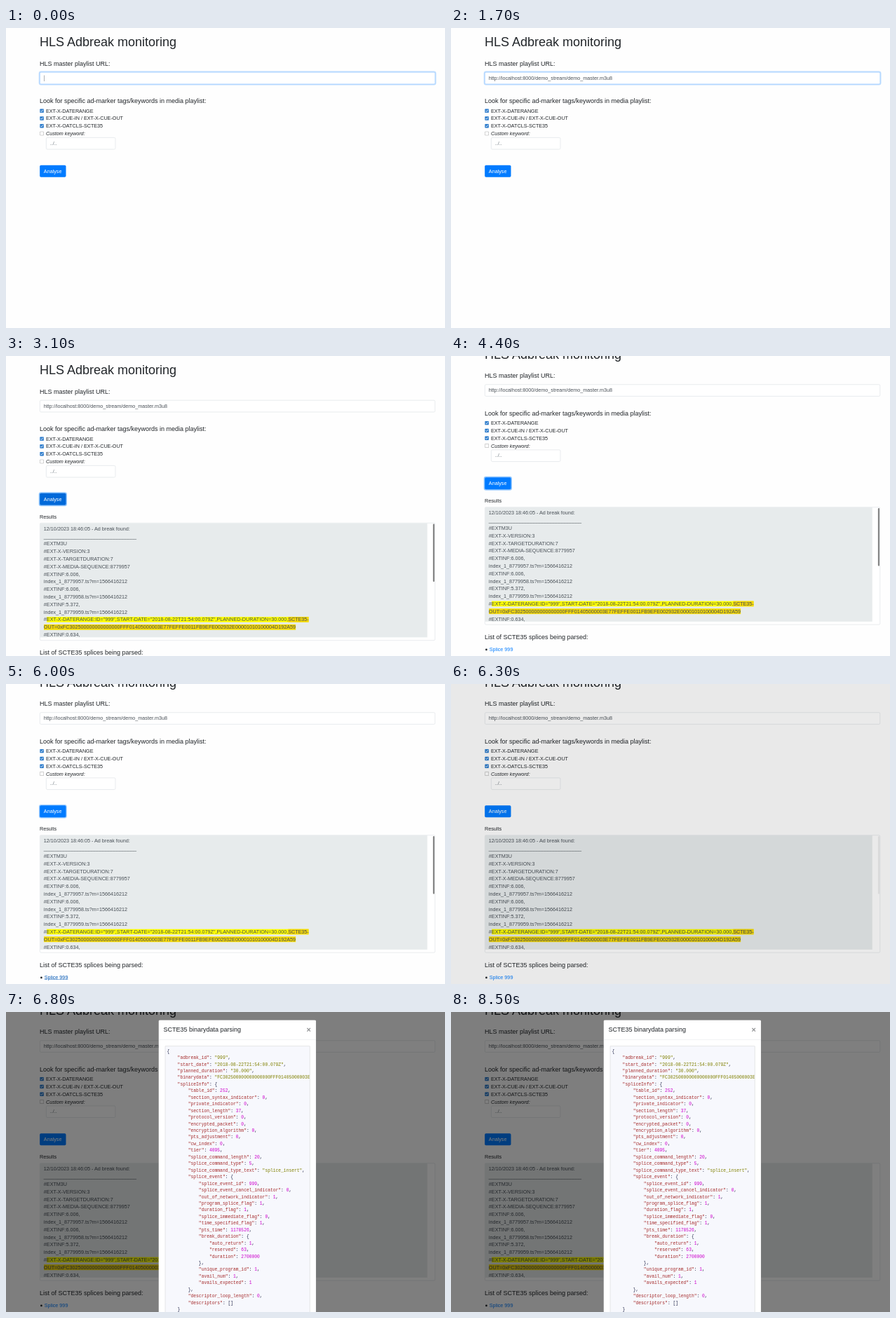
Animation of 626x428 px, one loop 8.9 s. Source, as an HTML page:

```html
<!DOCTYPE html>
<html lang="en">
<head>
<meta charset="utf-8">
<title>HLS Adbreak monitoring</title>
<style>
  html, body { margin: 0; width: 100%; height: 100%; overflow: hidden; background: #fefefe; }
  #stage { position: absolute; left: 0; top: 0; width: 1392px; height: 952px; overflow: hidden;
    transform: scale(.45); transform-origin: 0 0; background: #fefefe;
    font: 16px/24px "Liberation Sans", Arial, sans-serif; color: #212529; white-space: pre; }
  #stage *, #stage *::before { box-sizing: border-box; }
  #page, #backdrop { position: absolute; inset: 0; }
  #page > *, #modal > *, .abs { position: absolute; left: 106.7px; }
  h1, h5 { margin: 0; font-weight: 400; }
  h1 { font-size: 40px; line-height: 48px; }
  h5 { font-size: 20px; }
  .field { height: 38px; padding: 6px 12px; border: 1px solid #ced4da; border-radius: 4px;
    background: #fff; color: #495057; }
  .check { padding-left: 20px; }
  .check svg { position: absolute; left: 0; top: 5px; }
  #caret { position: absolute; left: 12px; top: 9px; width: 1.5px; height: 19px; background: #495057; }
  #button { top: 434.5px; height: 38px; padding: 7px 13px; border-radius: 4px; color: #fff; }
  #log { top: 529px; width: 1253px; height: 373px; padding: 0; overflow: hidden; }
  #text { width: 1227px; height: 362px; padding: 6px 12px; overflow: hidden; background: #e7ebec; }
  #text i { font-style: normal; background: #ff0; }
  #text b { font-weight: 400; background: #f3d70a; }
  #thumb { position: absolute; left: 1245px; top: 2px; width: 5px; height: 184px; border-radius: 3px; background: #858585; }
  #bullet { left: 108.5px; top: 977.5px; width: 6px; height: 6px; border-radius: 50%; background: #212529; }
  #link { left: 121.7px; top: 968px; }
  #backdrop { background: #000; }
  #modal { position: absolute; left: 483px; top: 25px; width: 500px; height: 1100px;
    background: #fff; border: 1px solid rgba(0, 0, 0, .2); border-radius: 5px; }
  #modal > h5 { left: 15px; top: 18px; }
  #close { left: 468px; top: 18px; font-size: 24px; font-weight: 700; opacity: .5; }
  #rule { left: 0; top: 62px; width: 498px; height: 1px; background: #dee2e6; }
  #json { left: 20px; top: 82px; width: 459px; margin: 0; padding: 5px 5px 12px; overflow: hidden;
    border: 1px solid #ccc; background: #f7f8fd;
    font: 14px/21px "Liberation Mono", monospace; color: #22264a; }
  #json::before { content: ""; position: absolute; left: 1px; bottom: 2px; width: 217px; height: 7px; background: #888; }
  .key { color: brown; } .string { color: olive; } .number { color: #c0c; }
</style>
</head>
<body>
<div id="stage">
  <div id="page">
    <h1 style="top:20px">HLS Adbreak monitoring</h1>
    <h5 style="top:99.5px">HLS master playlist URL:</h5>
    <div class="field" id="url" style="top:140px;width:1253px"><span id="address">http://localhost:8000/demo_stream/demo_master.m3u8</span><span id="caret"></span></div>
    <h5 style="top:218.5px">Look for specific ad-marker tags/keywords in media playlist:</h5>
    <div id="checks" style="top:250.5px"></div>
    <div class="field" style="left:126.7px;top:346.5px;width:220px;color:#6c757d">../..</div>
    <div id="button">Analyse</div>
    <div class="result" style="top:497.5px">Results</div>
    <div class="field result" id="log"><div id="text"></div><div id="thumb"></div></div>
    <h5 class="result" style="top:927.5px">List of SCTE35 splices being parsed:</h5>
    <div class="result" id="bullet"></div>
    <div class="result" id="link">Splice 999</div>
  </div>
  <div id="backdrop"></div>
  <div id="modal">
    <h5>SCTE35 binarydata parsing</h5>
    <div id="close">×</div>
    <div id="rule"></div>
    <pre id="json"></pre>
  </div>
</div>
<script>
const LOOP = 8900, STEP = 100;
const $ = id => document.getElementById(id);

const box = on => `<svg width="13" height="13"><rect x=".5" y=".5" width="12" height="12" rx="2"
  fill="${on ? '#2f7dcc' : '#fff'}" stroke="${on ? '#2f7dcc' : '#767676'}"/>${
  on ? '<path d="M3 6.7 5.5 9.2 10 3.6" fill="none" stroke="#fff" stroke-width="2"/>' : ''}</svg>`;
$('checks').innerHTML = ['EXT-X-DATERANGE', 'EXT-X-CUE-IN / EXT-X-CUE-OUT', 'EXT-X-OATCLS-SCTE35', '<em>Custom keyword:</em>']
  .map((label, i) => `<div class="check" style="position:relative">${box(i < 3)}${label}</div>`).join('');

const date = '2018-08-22T21:54:00.079Z';
const binary = 'FC302500000000000000FFF01405000003E77FEFFE0011FB9EFE002932E00001010100004D192A59';
const segment = (n, length) => `#EXTINF:${length},\nindex_1_${n}.ts?m=1566416212`;
$('text').innerHTML = [
  '12/10/2023 18:46:05 - Ad break found:', '_'.repeat(33),
  '#EXTM3U', '#EXT-X-VERSION:3', '#EXT-X-TARGETDURATION:7', '#EXT-X-MEDIA-SEQUENCE:8779957',
  segment(8779957, '6.006'), segment(8779958, '6.006'), segment(8779959, '5.372'),
  `#<i>EXT-X-DATERANGE:ID="999",START-DATE="${date}",PLANNED-DURATION=30.000,<b>SCTE35-\nOUT=0x${binary}</b></i>`,
  '#EXTINF:0.634,'
].join('\n');

const splice = {
  adbreak_id: '999', start_date: date, planned_duration: '30.000', binarydata: binary,
  spliceInfo: {
    table_id: 252, section_syntax_indicator: 0, private_indicator: 0, section_length: 37,
    protocol_version: 0, encrypted_packet: 0, encryption_algorithm: 0, pts_adjustment: 0,
    cw_index: 0, tier: 4095, splice_command_length: 20, splice_command_type: 5,
    splice_command_type_text: 'splice_insert',
    splice_event: {
      splice_event_id: 999, splice_event_cancel_indicator: 0, out_of_network_indicator: 1,
      program_splice_flag: 1, duration_flag: 1, splice_immediate_flag: 0, time_specified_flag: 1,
      pts_time: 1178526,
      break_duration: { auto_return: 1, reserved: 63, duration: 2700000 },
      unique_program_id: 1, avail_num: 1, avails_expected: 1
    },
    descriptor_loop_length: 0, descriptors: []
  }
};
$('json').innerHTML = JSON.stringify(splice, null, 4).replace(/("[^"]*")(:?)|\d+/g, (all, text, colon) =>
  text ? `<span class="${colon ? 'key' : 'string'}">${text}</span>${colon}` : `<span class="number">${all}</span>`);

const ramp = (t, start, length) => Math.min(1, Math.max(0, (t - start) / length));
const easeOut = x => 1 - (1 - x) ** 1.7;
const mix = (a, b, k) => `rgb(${a.map((v, i) => v + (b[i] - v) * k)})`;
const show = (el, on) => el.style.visibility = on ? 'visible' : 'hidden';

function draw(t) {
  const focus = 1 - ramp(t, 2650, 150);
  $('url').style.borderColor = mix([206, 212, 218], [128, 189, 255], focus);
  $('url').style.boxShadow = `0 0 0 ${3.2 * focus}px rgba(0,123,255,${.25 * focus})`;
  show($('address'), t >= 1000);
  show($('caret'), t < 1000);

  const hover = ramp(t, 2150, 150) - ramp(t, 3350, 150);
  const pressed = ramp(t, 2700, 150) - ramp(t, 5980, 150);
  $('button').style.background = mix([0, 123, 255], [0, 105, 217], hover);
  $('button').style.boxShadow = `0 0 0 ${3.2 * pressed}px rgba(38,143,255,${.5 * pressed})`;

  document.querySelectorAll('.result').forEach(el => show(el, t >= 2900));
  show($('thumb'), t >= 2900);
  $('thumb').style.opacity = 1 - ramp(t, 6130, 200);
  $('page').style.transform = `translateY(${-50 * easeOut(ramp(t, 4250, 120))}px)`;

  const over = t >= 5200 && t < 6300;
  $('link').style.color = over ? '#0056b3' : '#007bff';
  $('link').style.textDecoration = over ? 'underline' : 'none';

  $('backdrop').style.opacity = .5 * ramp(t, 6275, 150);
  $('modal').style.opacity = ramp(t, 6420, 150);
  $('modal').style.transform = `translateY(${-50 * (1 - easeOut(ramp(t, 6420, 300)))}px)`;
}

function tick() {
  draw(Math.floor(performance.now() % LOOP / STEP) * STEP);
  requestAnimationFrame(tick);
}
tick();
</script>
</body>
</html>
```
